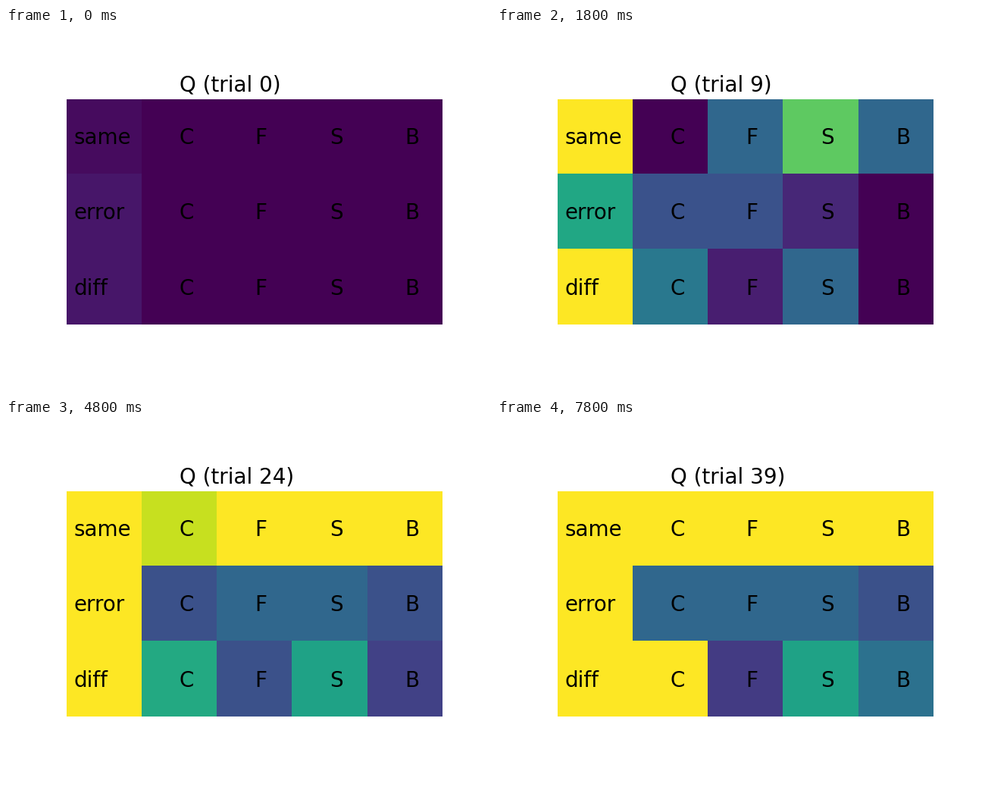
These frames come from a looping animation (640x480 px, 8 s). A matplotlib script:

```python
import math

import matplotlib.pyplot as plt
import numpy as np
from matplotlib.animation import FuncAnimation

TRIALS = 40
UNIT = 1 / 12  # size of one update

# State value: start and growth rate of a power curve.
VALUE = {"same": (0.03, 0.256), "error": (0.06, 0.1285), "diff": (0.06, 0.234)}

# Learning phases of each action: first trial, last trial, gain in units.
PHASES = {
    "same": {
        "C": [(12, 17, 11), (24, 28, 1)],
        "F": [(4, 12, 6), (12, 17, 6)],
        "S": [(0, 12, 12)],
        "B": [(6, 15, 12)],
    },
    "error": {
        "C": [(0, 9, 3), (36, 39, 1)],
        "F": [(0, 9, 3), (17, 24, 1)],
        "S": [(0, 6, 2), (6, 12, -1.3), (12, 17, 1.7), (17, 24, 1.6)],
        "B": [(17, 24, 3)],
    },
    "diff": {
        "C": [(0, 6, 4), (6, 17, 3.3), (24, 30, 4.7)],
        "F": [(6, 12, 3), (30, 36, -0.9)],
        "S": [(0, 6, 4), (17, 24, 2.9)],
        "B": [(17, 24, 2.3), (30, 39, 2.2)],
    },
}


def state_value(trial, start, rate):
    return start + rate * trial ** 0.65


def gained(trial, first, last, gain):
    """Part of the gain reached so far, in equal jumps of about one unit."""
    jumps = math.ceil(abs(gain))
    done = min(max((trial - first) / (last - first), 0), 1)
    return gain * UNIT * math.floor(jumps * done + 0.25) / jumps


def table(trial):
    return np.array([
        [state_value(trial, *VALUE[state])]
        + [sum(gained(trial, *p) for p in phases) for phases in actions.values()]
        for state, actions in PHASES.items()
    ])


fig = plt.figure(figsize=(6.4, 4.8), dpi=100)
ax = fig.add_subplot()
ax.axis("off")
image = ax.imshow(table(0), cmap="viridis", vmin=0, vmax=1,
                  interpolation="nearest")

font = dict(family="DejaVu Sans", size=20, color="black")
title = ax.text(1, -0.6, "", **font)
for row, (state, actions) in enumerate(PHASES.items()):
    ax.text(-0.4, row + 0.1, state, **font)
    for col, action in enumerate(actions, start=1):
        ax.text(col, row + 0.1, action, **font)


def draw(trial):
    image.set_data(table(trial))
    title.set_text(f"Q (trial {trial})")
    return image, title


anim = FuncAnimation(fig, draw, frames=TRIALS, interval=200,
                     repeat=True, repeat_delay=0)
plt.show()
```
